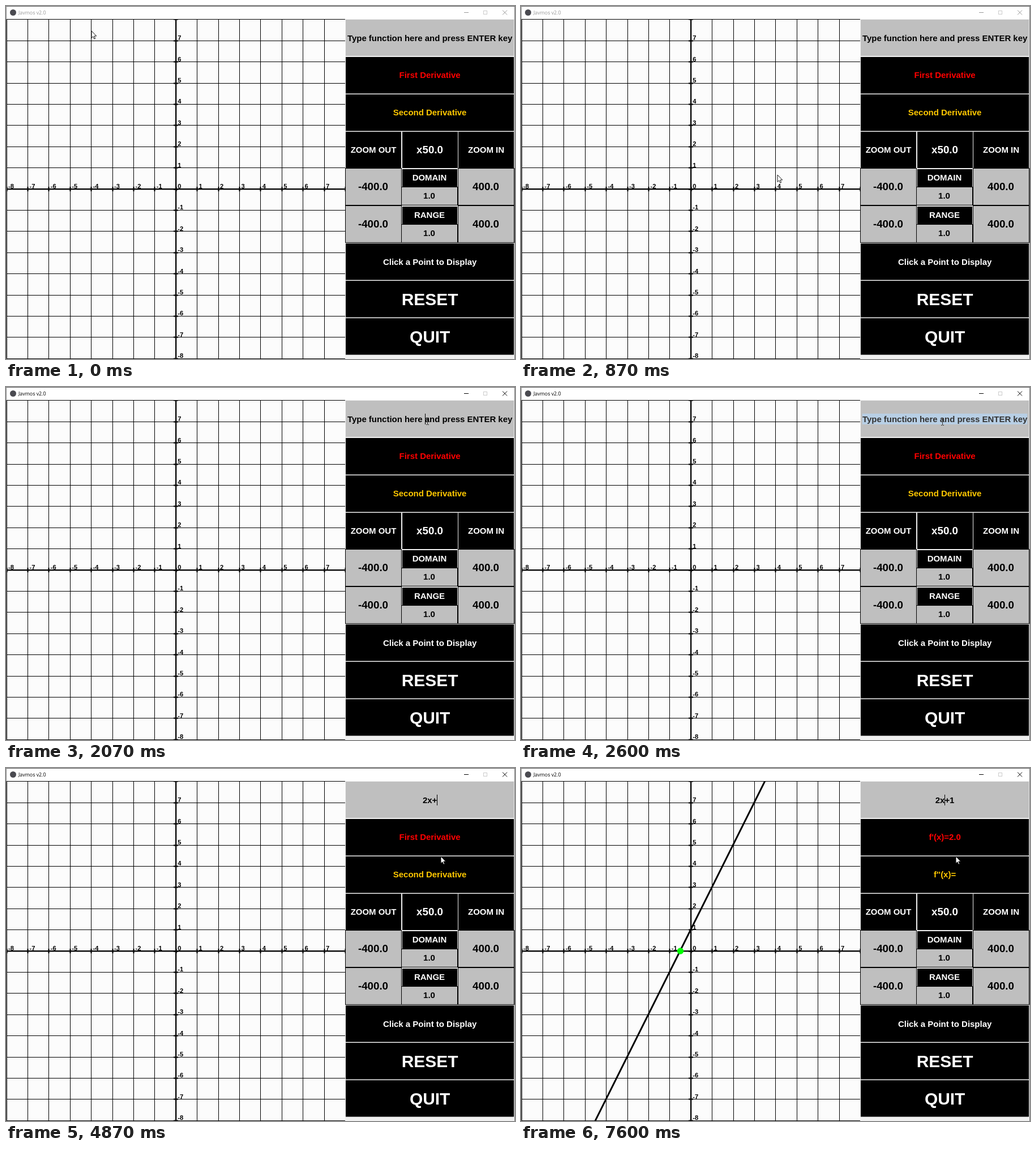
Write an HTML page with a canvas that moves like this. It is 899 px wide and 623 px high and loops after 8000 ms.

```html
<!DOCTYPE html>
<html lang="en">
<head>
<meta charset="utf-8">
<title>Javmos v2.0</title>
<style>
html, body { margin: 0; width: 100%; height: 100%; overflow: hidden; background: #fff; }
canvas { display: block; }
</style>
</head>
<body>
<canvas id="stage" width="899" height="623"></canvas>
<script>
const ctx = document.getElementById('stage').getContext('2d');
const LOOP = 8000, TICK = 100 / 3;
const UNIT = 37.4, OX = 299.8, OY = 322.6;
const MID = 748.6, ROW = 65.85, TOP = 24;
const SMALL = 14.96, MEDIUM = 18.7, LARGE = 29.9;
const GREY = '#bfbfbf', ORANGE = '#ffc800', GAP = '#f0f0f0';
const PROMPT = 'Type function here and press ENTER key';

const setFont = size => { ctx.font = `bold ${size}px "Liberation Sans", Arial, sans-serif`; };

function rect(x, y, w, h, color) {
  ctx.fillStyle = color;
  ctx.fillRect(x, y, w, h);
}

function label(text, x, y, size, color) {
  setFont(size);
  ctx.textAlign = 'center';
  ctx.fillStyle = color;
  ctx.fillText(text, x, y + size * 0.35);
}

function stroke(points, color, width) {
  ctx.beginPath();
  points.forEach(([x, y]) => ctx.lineTo(x, y));
  ctx.strokeStyle = color;
  ctx.lineWidth = width;
  ctx.stroke();
}

function disc(x, y, r, color) {
  ctx.beginPath();
  ctx.arc(x, y, r, 0, Math.PI * 2);
  ctx.fillStyle = color;
  ctx.fill();
}

function drawTitleBar(active) {
  const ink = active ? '#000' : '#999';
  rect(0, 0, 899, 23, '#fff');
  disc(12.5, 11.5, 5.5, '#4a4a50');
  ctx.font = '8.8px "Open Sans", "Noto Sans", sans-serif';
  ctx.textAlign = 'left';
  ctx.fillStyle = ink;
  ctx.fillText('Javmos v2.0', 22, 15);
  rect(809, 11, 8, 1, ink);
  ctx.strokeStyle = '#ccc';
  ctx.lineWidth = 1;
  ctx.strokeRect(843.5, 8.5, 6, 6);
  stroke([[877, 7.5], [885, 15.5]], ink, 1);
  stroke([[885, 7.5], [877, 15.5]], ink, 1);
}

function drawPlane() {
  rect(0, 23, 600, 600, '#fcfcfc');
  for (let k = -8; k <= 8; k++) {
    rect(Math.round(OX + k * UNIT), 23, 1, 600, '#000');
    rect(1, Math.round(OY - k * UNIT), 598, 1, '#000');
  }
  rect(299, 23, 2.3, 600, '#000');
  rect(1, 322, 598, 2.3, '#000');
  setFont(11.2);
  ctx.textAlign = 'left';
  for (let k = -8; k <= 8; k++) {
    const x = OX + k * UNIT, y = OY - k * UNIT;
    rect(Math.round(x) - 0.6, 319, 2.2, 8, '#000');
    rect(296, Math.round(y) - 0.6, 8, 2.2, '#000');
    if (k < 8) {
      ctx.fillText(k, x + 3.4, 322);
      if (k) ctx.fillText(k, OX + 3.4, y - 0.6);
    }
  }
}

function drawGraph(part, root) {
  if (part <= 0) return;
  const at = x => [OX + x * UNIT, OY - (2 * x + 1) * UNIT];
  ctx.save();
  ctx.beginPath();
  ctx.rect(0, 24, 599, 600);
  ctx.clip();
  stroke([at(-4.6), at(-4.6 + 8.2 * part)], '#000', 3);
  ctx.restore();
  if (root) disc(OX - UNIT / 2 + 0.4, OY + 0.4, 5.8, '#0f0');
}

function button(row, text, size, color) {
  const y = TOP + row * ROW;
  rect(600, Math.round(y), 297, 64.5, '#000');
  label(text, MID, y + 32.4, size, color);
}

function field(x, y, w, h, text, size) {
  rect(x, y, w, h, '#000');
  rect(x + 1, y + 1, w - 2, h - 2, GREY);
  label(text, x + w / 2 - 0.5, y + h / 2 - 0.5, size, '#000');
}

function drawLimits(row, name) {
  const y = Math.round(TOP + row * ROW) - 1;
  field(599, y, 100, 66, '-400.0', MEDIUM);
  field(798, y, 100, 66, '400.0', MEDIUM);
  rect(699, y, 99, 66, GAP);
  rect(700, y + 2, 97, 31, '#000');
  label(name, 748, y + 16.5, SMALL, '#fff');
  field(698, y + 33, 100, 33, '1.0', SMALL);
}

function drawInput({ text, selected, caret }) {
  rect(600, 24, 297, 64, GREY);
  setFont(SMALL);
  const width = ctx.measureText(text).width, left = MID - width / 2;
  if (selected) rect(left, 47, width, 19, '#b8cfe5');
  label(text, MID, 56.5, SMALL, selected ? '#333' : '#000');
  if (caret >= 0) {
    setFont(SMALL);
    const x = left + ctx.measureText(text.slice(0, caret)).width;
    rect(Math.min(896, Math.round(x)), 47, 1, 19, '#000');
  }
}

function drawPanel(input, solved) {
  rect(599, 23, 300, 600, GAP);
  drawInput(input);
  button(1, solved ? "f'(x)=2.0" : 'First Derivative', SMALL, '#f00');
  button(2, solved ? "f''(x)=" : 'Second Derivative', SMALL, ORANGE);
  ['ZOOM OUT', 'x50.0', 'ZOOM IN'].forEach((text, i) => {
    const x = 600 + i * 99.5;
    rect(Math.round(x), 222, 98, 64, '#000');
    label(text, x + 49, 253.8, i === 1 ? MEDIUM : SMALL, '#fff');
  });
  drawLimits(4, 'DOMAIN');
  drawLimits(5, 'RANGE');
  button(6, 'Click a Point to Display', SMALL, '#fff');
  button(7, 'RESET', LARGE, '#fff');
  button(8, 'QUIT', LARGE, '#fff');
}

// Time, x, y and the power used to ease into each stop
const easeIn = p => Math.pow(p, 1.25);
const easeOut = p => 1 - (1 - p) ** 2;
const smooth = p => p * p * (3 - 2 * p);
const path = [
  [0, 151, 44],
  [233, 308, 187, easeIn],
  [500, 450, 300, easeOut],
  [840, 450, 300, smooth],
  [1333, 767, 83, smooth],
  [1667, 744, 60, smooth],
  [2570, 744, 60, smooth],
  [3100, 768, 156, smooth]
];

function pointerAt(t) {
  const i = path.findIndex(stop => stop[0] > t);
  if (i < 0) return path[path.length - 1].slice(1);
  const [t0, x0, y0] = path[i - 1], [t1, x1, y1, ease] = path[i];
  const p = ease((t - t0) / (t1 - t0));
  return [x0 + (x1 - x0) * p, y0 + (y1 - y0) * p];
}

function drawPointer(x, y) {
  ctx.save();
  ctx.translate(Math.round(x), Math.round(y));
  if (x >= 600 && y >= 24 && y < 89) {
    rect(0, -5, 1, 11, '#333');
    for (const end of [-6, 6]) {
      rect(-2, end, 2, 1, '#333');
      rect(1, end, 2, 1, '#333');
    }
  } else {
    ctx.beginPath();
    [[0, 0], [0, 12.5], [2.8, 9.8], [4.8, 14.2], [6.7, 13.3], [4.8, 9], [8.7, 9]]
      .forEach(([a, b]) => ctx.lineTo(a, b));
    ctx.closePath();
    ctx.fillStyle = '#fff';
    ctx.fill();
    ctx.strokeStyle = '#000';
    ctx.lineWidth = 0.9;
    ctx.stroke();
  }
  ctx.restore();
}

// Each edit restarts the caret's blink
const edits = [
  [0, PROMPT, -1],
  [1900, PROMPT, PROMPT.indexOf('and')],
  [2100, PROMPT, PROMPT.length, true],
  [4130, '2', 1],
  [4470, '2x', 2],
  [4870, '2x+', 3],
  [5130, '2x+1', 4],
  [7400, '2x+1', 3],
  [7600, '2x+1', 2]
];

function inputAt(t) {
  const [start, text, caret, selected] = edits.filter(e => e[0] <= t).pop();
  const lit = Math.floor((t - start) / 500) % 2 === 0;
  return { text, selected, caret: lit ? caret : -1 };
}

function draw(t) {
  const tick = Math.floor((t + 4) / TICK);
  drawPlane();
  drawGraph(Math.min(1, (tick - 177) / 6), tick >= 184);
  drawPanel(inputAt(t), t >= 5700);
  drawTitleBar(t >= 1665);
  rect(0, 0, 899, 1, '#555');
  rect(0, 0, 1, 623, '#888');
  rect(898, 0, 1, 623, '#777');
  drawPointer(...pointerAt(tick * TICK));
}

let begin;
function loop(now) {
  begin ??= now;
  draw((now - begin) % LOOP);
  requestAnimationFrame(loop);
}
draw(0);
requestAnimationFrame(loop);
</script>
</body>
</html>
```
